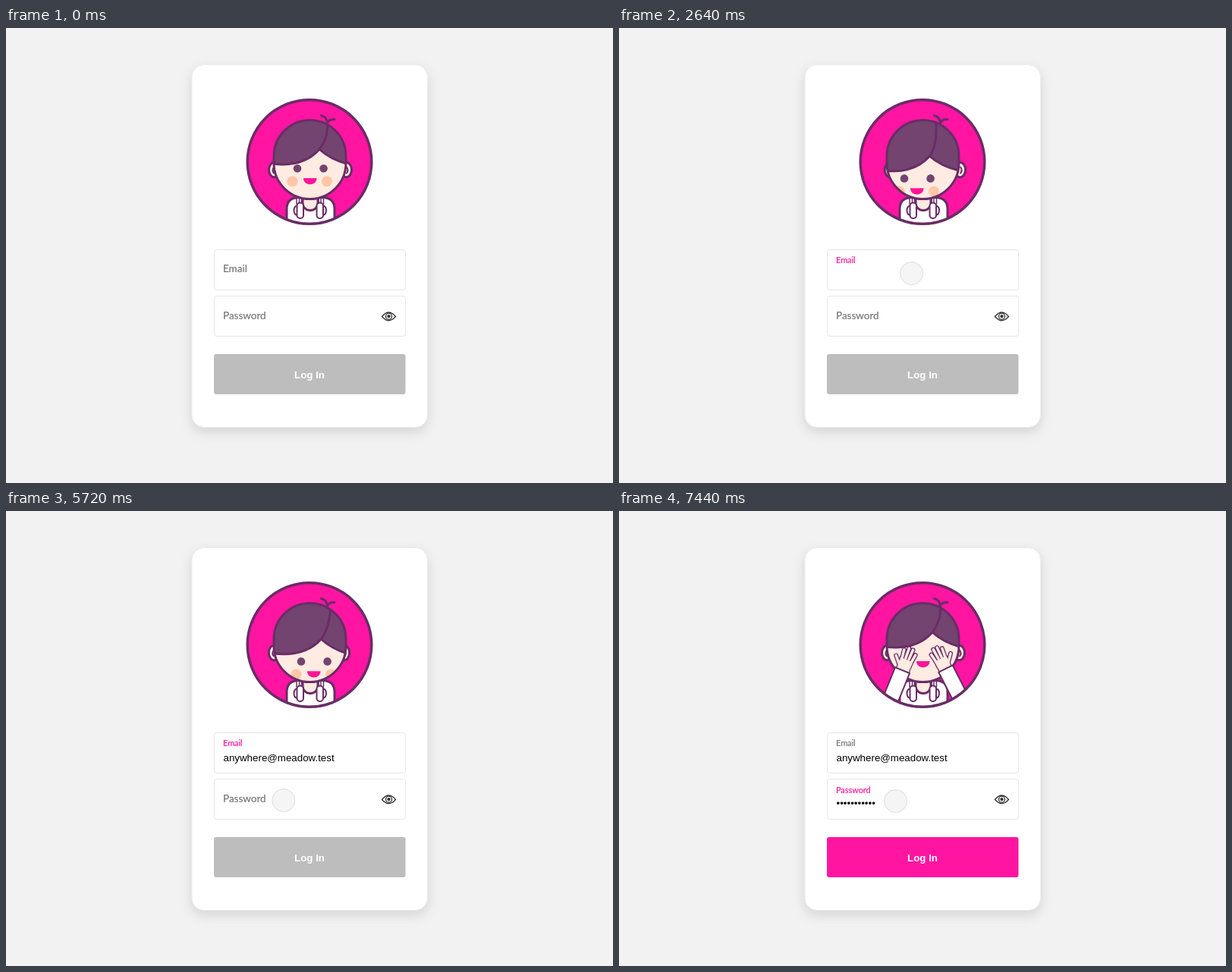
An HTML page for the animation above (8000 ms loop, 800 by 600 pixels).

```html
<!DOCTYPE html>
<html lang="en">
<head>
<meta charset="utf-8">
<title>Login</title>
<style>
html, body { margin: 0; width: 100%; height: 100%; overflow: hidden; background: #f2f2f2; }
svg { display: block; width: 800px; height: 600px; }
.card { fill: #fff; stroke: #ececec; filter: drop-shadow(0 6px 8px rgba(0, 0, 0, .12)); }
.field { fill: #fff; stroke: #e6e6e6; }
.label { font-family: Lato, "Open Sans", sans-serif; stroke-width: .2; }
.value { font: 13.33px "Liberation Sans", Arial, sans-serif; }
.button { font: bold 13.33px "Liberation Sans", Arial, sans-serif; fill: #fff; }
.ink { stroke: #6a2c66; stroke-width: 3; stroke-linecap: round; stroke-linejoin: round; }
.none { fill: none; }
.white { fill: #fff; }
.skin { fill: #ffebe2; }
.hair { fill: #72446f; }
.cheek { fill: #ffc7a6; }
.thin { stroke-width: 2; }
.fingers { fill: none; stroke-linecap: round; }
</style>
</head>
<body>
<svg viewBox="0 0 800 600">
  <defs>
    <clipPath id="disc"><circle cx="400" cy="176.5" r="82"/></clipPath>
    <clipPath id="skull"><rect x="353" y="121.5" width="95" height="104" rx="47.5"/></clipPath>
    <path id="fingers" d="M-6.5-15L-8-26M-2-16L-2.5-30M2.5-16L3-30M7-14L8.5-25M-7-6L-15-15"/>
    <path id="palm" d="M-8 0L-8.5-15H9L8.5 0Z"/>
    <g id="arm">
      <g stroke="#6a2c66" fill="#6a2c66">
        <use href="#fingers" class="fingers" stroke-width="6"/>
        <use href="#palm" stroke-width="2.4"/>
      </g>
      <use href="#palm" class="skin"/>
      <use href="#fingers" class="fingers" stroke="#ffebe2" stroke-width="3.4"/>
      <rect class="ink white thin" x="-10.3" width="20.6" height="70"/>
    </g>
    <g id="strap">
      <path class="ink none" stroke-width="1.5" style="stroke-width:1.5" d="M383 223V232M386.500 223V231M389.500 223V231"/>
      <path class="ink white thin" d="M384 234Q379.500 235 379.500 240.500T384 247Z"/>
      <rect class="ink white thin" x="383.500" y="230.500" width="8.500" height="20.500" rx="4"/>
    </g>
  </defs>

  <rect class="card" x="245" y="48.500" width="310.500" height="478" rx="16"/>

  <g clip-path="url(#disc)">
    <circle cx="400" cy="176.500" r="82" fill="#ff15a1"/>
    <path class="ink white" d="M370 265V239Q370 223.500 386 223.500H417Q433 223.500 433 239V265Z"/>
    <path class="ink skin" d="M391 220V231a10 9.500 0 0 0 20 0V220"/>
    <use href="#strap"/>
    <use href="#strap" transform="matrix(-1 0 0 1 801.5 0)"/>
    <g id="earL">
      <ellipse class="ink skin" cx="353.500" cy="187" rx="7" ry="9.800"/>
      <path class="ink none thin" d="M353 183.500q-3 4 0 8"/>
    </g>
    <g id="earR">
      <ellipse class="ink skin" cx="448.500" cy="187" rx="7" ry="9.800"/>
      <path class="ink none thin" d="M449 183.500q3 4 0 8"/>
    </g>
    <g clip-path="url(#skull)">
      <rect class="skin" x="350" y="118" width="100" height="110"/>
      <g id="face">
        <circle class="cheek" cx="377.500" cy="202.300" r="7"/>
        <circle class="cheek" cx="423" cy="202.300" r="7"/>
        <circle class="hair" cx="384" cy="185.200" r="5.300"/>
        <circle class="hair" cx="418.600" cy="185.200" r="5.300"/>
        <path fill="#ff1596" d="M392 198H409.500C409.500 209 392 209 392 198Z"/>
      </g>
      <path id="hairR" class="ink hair"/>
      <path id="hairL" class="ink hair"/>
    </g>
    <rect class="ink none" x="353" y="121.500" width="95" height="104" rx="47.500"/>
    <path class="ink none" d="M415.500 115.500Q422.500 117 423.500 125Q426 120 433 120.500"/>
    <g id="arms">
      <use href="#arm" transform="translate(373.5 210) rotate(22)"/>
      <use href="#arm" transform="translate(430.5 208) rotate(-27) scale(-1 1)"/>
    </g>
  </g>
  <circle class="none" cx="400" cy="176.500" r="81.800" stroke="#6a2c66" stroke-width="3.500"/>

  <rect class="field" x="274.500" y="292.500" width="252" height="53" rx="3"/>
  <rect class="field" x="274.500" y="353.500" width="252" height="53" rx="3"/>
  <text id="mailLabel" class="label" x="286">Email</text>
  <text id="passLabel" class="label" x="286">Password</text>
  <text id="mail" class="value" x="286.500" y="330"></text>
  <text id="pass" class="value" x="286.500" y="390"></text>
  <g class="none" stroke="#333" stroke-width="1.300">
    <path d="M495.500 380.500Q504.500 369.500 513.500 380.500Q504.500 391 495.500 380.500Z"/>
    <circle cx="504.500" cy="380.200" r="4"/>
    <circle cx="504.500" cy="380.200" r="1.500" fill="#333"/>
  </g>
  <rect id="button" x="274" y="430" width="252.500" height="53" rx="3"/>
  <text class="button" x="400" y="462" text-anchor="middle">Log In</text>
  <circle id="touch"/>
</svg>
<script>
const LOOP = 8000, MAIL = "anywhere@meadow.test";
const GREY = [117, 117, 117], PINK = [255, 21, 161], OFF = [189, 189, 189];
const $ = id => document.getElementById(id);
const set = (id, attrs) => { for (const k in attrs) $(id).setAttribute(k, attrs[k]); };
const span = (t, a, b) => Math.min(1, Math.max(0, (t - a) / (b - a)));
const smooth = p => p * p * (3 - 2 * p);
const easeOut = p => 1 - (1 - p) ** 2;
const mix = (a, b, p) => a + (b - a) * p;
const blend = (a, b, p) => `rgb(${a.map((v, i) => Math.round(mix(v, b[i], p)))})`;
const count = (t, start, step, max) => Math.min(max, Math.max(0, Math.floor((t - start) / step) + 1));
const move = (id, x, y) => set(id, { transform: `translate(${x} ${y})` });

// A linear ramp of the given length, followed with an exponential lag
function follow(t, length, lag) {
  if (t <= 0) return 0;
  const up = s => (s - lag * (1 - Math.exp(-s / lag))) / length;
  return t < length ? up(t) : 1 - (1 - up(length)) * Math.exp((length - t) / lag);
}

function label(id, y, up, focus) {
  const color = blend(GREY, PINK, focus);
  set(id, { y: mix(y, y - 12.3, up), "font-size": mix(13.5, 10.9, up), fill: color, stroke: color });
}

function drawHead(dx, down) {
  move("face", dx, 13.2 * down);
  move("earL", 1.3 * down - .3 * dx, 0);
  move("earR", -1.3 * down - .3 * dx, 0);
  const x = 413 + .45 * dx, y = 160 + 9 * down, top = 423 + .8 * dx, side = 179 + 9 * down;
  set("hairL", { d: `M340 110H${top}C${top + 3} 135 ${x + 9} ${y - 12} ${x} ${y}C${x - 16} ${y + 18} ${x - 40} ${y + 23} 345 ${side - 1}Z` });
  set("hairR", { d: `M${top - 10} 110H460V${side + 2}Q${x + 19} ${y + 17} ${x} ${y}Z` });
}

function touchAt(t) {
  if (t < 1200) {
    const p = easeOut(span(t, 280, 800)), q = 1 - p;
    const bez = (a, b, c, d) => q * q * q * a + 3 * q * q * p * b + 3 * q * p * p * c + p * p * p * d;
    return [bez(750, 560, 440, 658), bez(111, 300, 450, 318)];
  }
  if (t < 1600) {
    const p = easeOut(span(t, 1160, 1400));
    return [mix(658, 431.5, p), mix(318, 323.5, p)];
  }
  if (t < 5280) return [mix(431.5, 385.5, easeOut(span(t, 1560, 1800))), 323.5];
  const p = span(t, 5240, 5880);
  return [mix(385.5, 364.5, easeOut(p)), mix(323.5, 382.5, 1 - (1 - p) ** 3)];
}

function draw(t) {
  const focus = smooth(span(t, 2320, 2620)), leave = smooth(span(t, 6200, 6480));
  const typed = follow(t - 3640, 684, 150);
  drawHead((-8 * focus + 13 * typed) * (1 - leave), focus * (1 - leave));
  move("arms", 0, 90 * (1 - easeOut(span(t, 6500, 6880))));

  label("mailLabel", 322.3, focus, focus * (1 - leave));
  label("passLabel", 383.8, leave, leave);
  $("mail").textContent = MAIL.slice(0, count(t, 3640, 36, MAIL.length));
  $("pass").textContent = "•".repeat(count(t, 7040, 40, 11));
  set("button", { fill: blend(OFF, PINK, smooth(span(t, 6520, 6840))) });

  const [cx, cy] = touchAt(t);
  const press = (t >= 2160 && t < 2320) || (t >= 6040 && t < 6200);
  set("touch", {
    cx, cy, r: press ? 14.3 : 15,
    visibility: t < 320 ? "hidden" : "visible",
    fill: `rgba(0,0,0,${press ? .095 : .04})`,
    stroke: `rgba(0,0,0,${press ? .28 : .15})`,
    "stroke-width": .8
  });
}

const start = performance.now();
function tick() {
  draw((performance.now() - start) % LOOP);
  requestAnimationFrame(tick);
}
tick();
</script>
</body>
</html>
```
